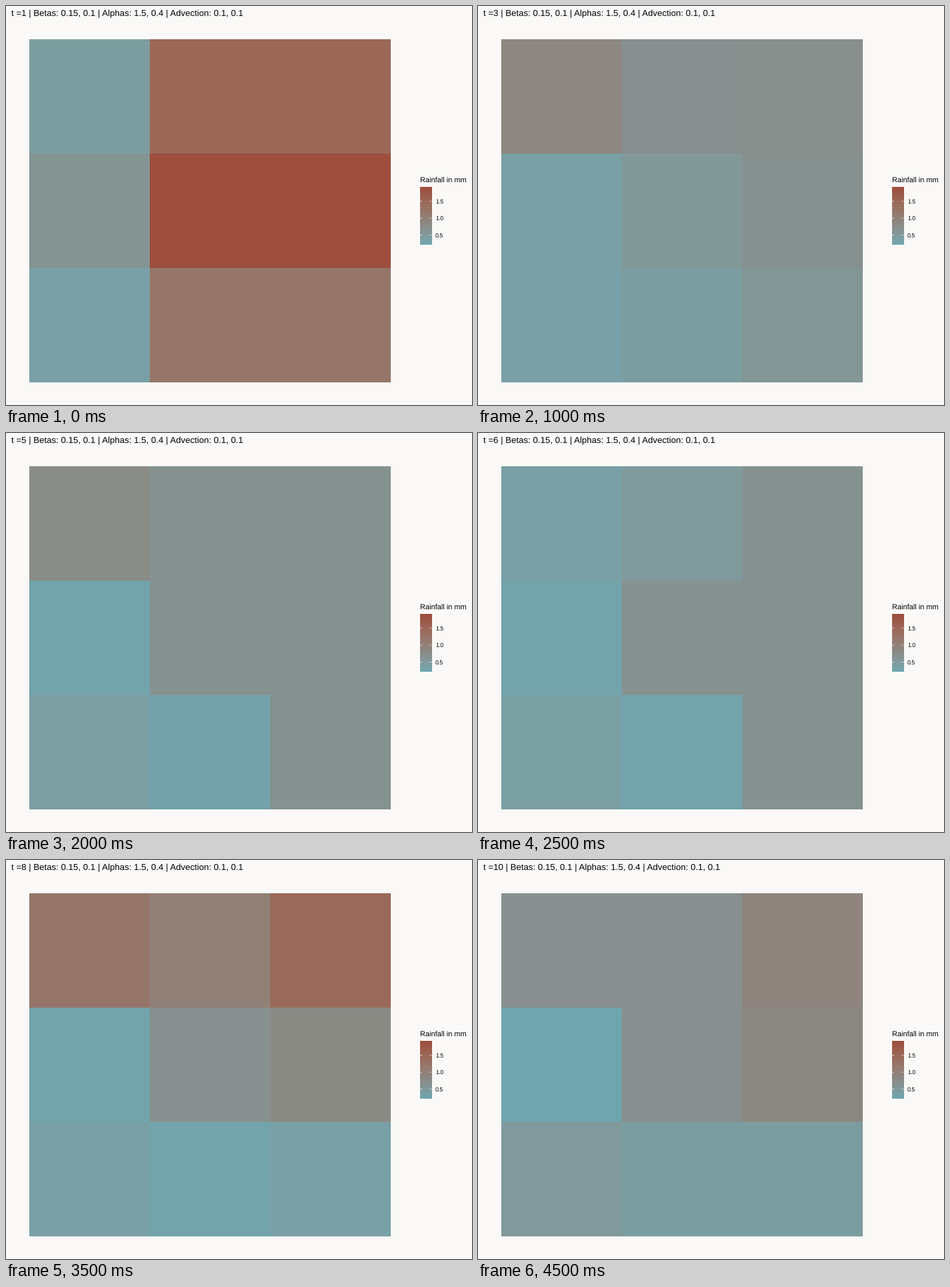
These frames come from a looping animation (700 by 600 pixels, 5000 ms). A matplotlib script:

```python
import numpy as np
import matplotlib.pyplot as plt
from matplotlib.animation import FuncAnimation
from matplotlib.colors import LinearSegmentedColormap

W, H, DPI = 700, 600, 100
PX = 72 / DPI  # points per pixel
LOW, HIGH = 0.215, 1.9
BACK = "#faf9f7"

plt.rcParams["font.family"] = "Liberation Sans"
plt.rcParams["text.hinting"] = "none"

# Rainfall value -> colour
STOPS = {
    LOW: "#6fa6b0", 0.35: "#79a1a7", 0.43: "#7d9d9f", 0.5: "#82999b",
    0.62: "#859391", 0.68: "#88908e", 0.8: "#8b8a84", 0.9: "#8e847e",
    1.0: "#928077", 1.18: "#96776b", 1.45: "#9b6959", HIGH: "#9e4d3c",
}
cmap = LinearSegmentedColormap.from_list(
    "rain", [((v - LOW) / (HIGH - LOW), c) for v, c in STOPS.items()], N=512)

# Rainfall on the 3 x 3 grid by time step, rows from top to bottom
RAIN = {
    1: [0.43, 1.45, 1.45, 0.60, 1.88, 1.88, 0.35, 1.18, 1.18],
    2: [0.50, 0.57, 0.37, 0.43, 0.43, 0.68, 0.31, 0.50, 0.62],
    4: [1.18, 0.78, 1.00, 0.29, 0.63, 0.63, 0.39, 0.33, 0.50],
    5: [0.76, 0.63, 0.62, 0.28, 0.62, 0.62, 0.40, 0.30, 0.62],
    6: [0.35, 0.48, 0.62, 0.28, 0.62, 0.62, 0.39, 0.28, 0.62],
    7: [0.82, 0.60, 0.84, 0.62, 0.35, 0.28, 0.90, 0.54, 0.44],
    8: [1.18, 1.00, 1.44, 0.28, 0.67, 0.78, 0.35, 0.27, 0.35],
    10: [0.67, 0.67, 0.90, 0.23, 0.67, 0.82, 0.50, 0.43, 0.43],
}
times = list(RAIN)
cells = np.array(list(RAIN.values()))


def field(t):
    return np.array([np.interp(t, times, c) for c in cells.T]).reshape(3, 3)


fig = plt.figure(figsize=(W / DPI, H / DPI), dpi=DPI, facecolor=BACK)
ax = fig.add_axes([0, 0, 1, 1])


def label(x, y, text, size):
    return ax.text(x, y, text, size=size * PX, color="black",
                   ha="left", va="baseline")


def image(data, extent, interpolation):
    return ax.imshow(data, cmap=cmap, vmin=LOW, vmax=HIGH, extent=extent,
                     aspect="auto", interpolation=interpolation)


grid = image(field(1), (35, 578, 566, 50), "nearest")
title = label(8, 15.2, "", 13.2)

# Legend
bar = (622, 639.3, 359.3, 273)
image(np.linspace(HIGH, LOW, 256)[:, None], bar, "bilinear")
label(622, 266.2, "Rainfall in mm", 11)
for value in (0.5, 1.0, 1.5):
    y = 319.1 - (value - 1) * 51.2
    for x in (bar[0], bar[1] - 3.46):
        ax.plot([x, x + 3.46], [y, y], color="white", lw=0.6 * PX,
                solid_capstyle="butt", snap=False)
    label(645, y + 3.1, f"{value:.1f}", 8.8)

ax.set_xlim(0, W)
ax.set_ylim(H, 0)
ax.axis("off")


def draw(i):
    t = i + 1
    grid.set_data(field(t))
    title.set_text(f"t ={t} | Betas: 0.15, 0.1 | Alphas: 1.5, 0.4"
                   " | Advection: 0.1, 0.1")
    return grid, title


anim = FuncAnimation(fig, draw, frames=10, interval=500, repeat=True,
                     repeat_delay=0)
plt.show()
```
